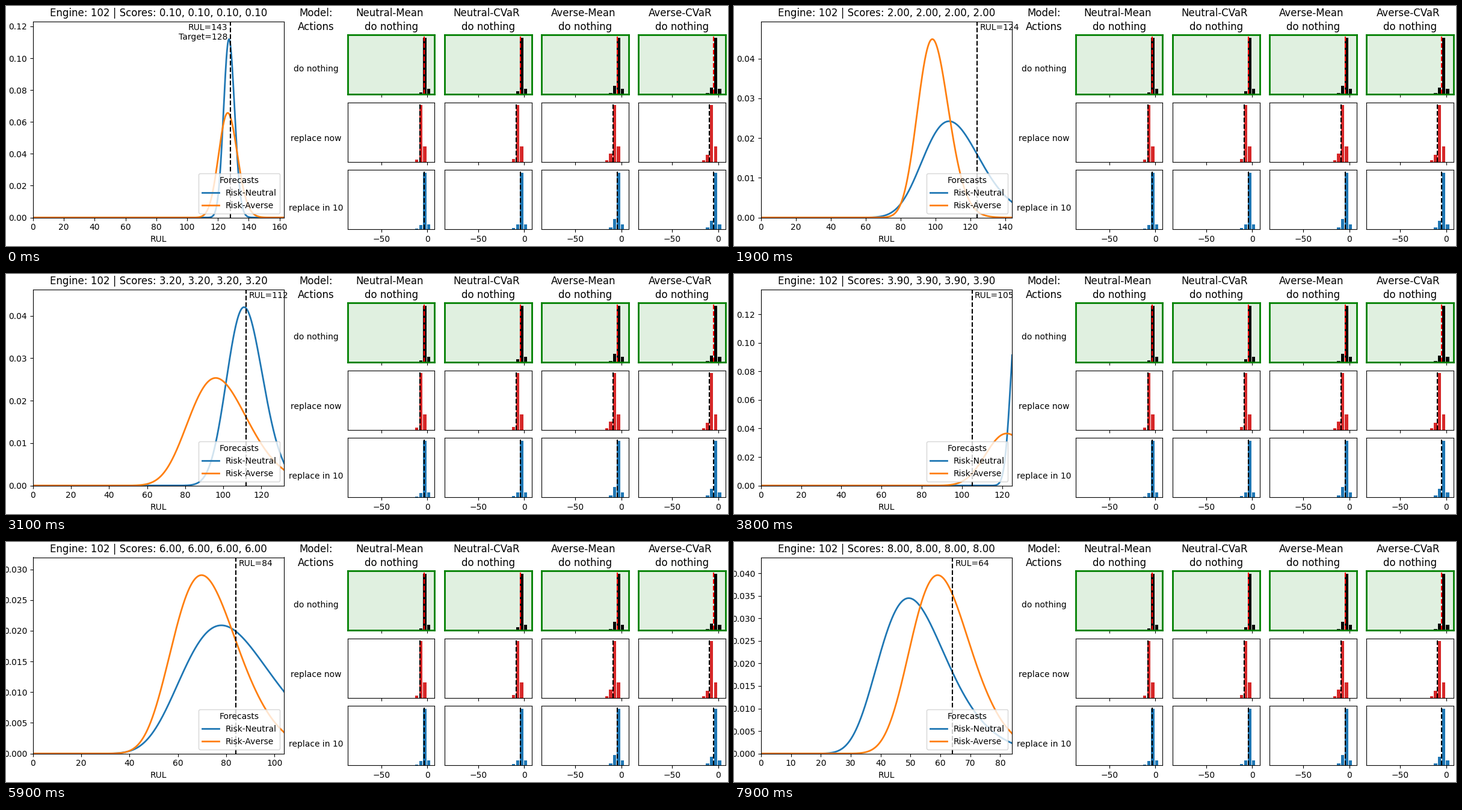
Recreate the animation shown at these times as a matplotlib script. Size 1200 px wide and 400 px high, loop 8000 ms.

```python
import matplotlib.pyplot as plt
import numpy as np
from matplotlib.animation import FuncAnimation
from matplotlib.transforms import Bbox

W, H, DPI = 1200, 400, 100
FRAMES, INTERVAL = 80, 100
START_RUL, TARGET = 143, 128

plt.rcParams.update({"font.family": "DejaVu Sans", "font.size": 10})
fig = plt.figure(figsize=(W / DPI, H / DPI), dpi=DPI, facecolor="white")


def axes_px(x, y, w, h):
    """Axes placed in pixels from the top left corner."""
    return fig.add_axes([x / W, 1 - (y + h) / H, w / W, h / H])


def text_px(x, y, s, **kw):
    return fig.text(x / W, 1 - y / H, s, ha="center", **kw)


# Forecasts: key points (step, mode, log-width) of a log-normal curve
FORECASTS = {
    "Risk-Neutral": [(0, 127.2, .028), (12, 120.9, .086), (25, 96.7, .244),
                     (38, 127.5, .025), (48, 54.7, .31), (59, 78, .238),
                     (79, 49.4, .228)],
    "Risk-Averse": [(0, 126.4, .048), (12, 127.1, .025), (25, 73.5, .27),
                    (38, 122.3, .089), (48, 47.2, .284), (59, 69.8, .193),
                    (79, 59.1, .168)],
}


def lognormal(x, mode, s):
    z = np.log(x / mode) / s - s
    return np.exp(-z * z / 2) / (x * s * np.sqrt(2 * np.pi))


def shape_at(i, keys):
    steps, modes, widths = np.transpose(keys)
    return (np.interp(i, steps, modes),
            np.exp(np.interp(i, steps, np.log(widths))))


main = axes_px(44.9, 25.5, 417.4, 327.05)
main.set_xlabel("RUL")
title = main.set_title("")
curves = {name: main.plot([], [], color=color, lw=2, label=name)[0]
          for name, color in zip(FORECASTS, ("tab:blue", "tab:orange"))}
marker = main.axvline(TARGET, color="black", ls="--", lw=1.5)
note = main.annotate("", (TARGET, 0.99), xycoords=main.get_xaxis_transform(),
                     xytext=(0, 0), textcoords="offset points",
                     va="top", annotation_clip=False)
main.legend(title="Forecasts", loc="lower right")

# Action grid: each histogram has a right bar, a peak and a decaying left tail
BIN, FIRST_BIN = 4.35, 1.45
TAIL_DECAY, SMALLEST = 0.2, 0.012
CELL_W, CELL_H, PITCH_X, PITCH_Y = 144.4, 99.2, 161.14, 112.4
GRID_X, GRID_Y = 568, 48.15
LINE_1, LINE_2 = 17.17, 39.8

# action: bar colour, mean colour, bins shifted left, right bar, extra tail
ACTIONS = {
    "do nothing": ("black", "red", 0, .1, 0),
    "replace now": ("tab:red", "black", 1, .275, 0),
    "replace in 10": ("tab:blue", "black", 0, .085, .035),
}
# model: first tail bar, mean
MODELS = {
    "Neutral-Mean": (.04, -3.6),
    "Neutral-CVaR": (.055, -4.5),
    "Averse-Mean": (.15, -4.5),
    "Averse-CVaR": (.12, -5),
}


def draw_cell(row, col, action, model):
    color, mean_color, shift, right, extra = action
    tail, mean = model
    heights = np.array([right, 1, *(tail + extra) * TAIL_DECAY ** np.arange(3)])
    heights = heights[heights > SMALLEST]
    bins = shift + np.arange(len(heights))

    ax = axes_px(GRID_X + PITCH_X * col, GRID_Y + PITCH_Y * row, CELL_W, CELL_H)
    ax.set(xlim=(-86.5, 7.9), ylim=(0, 1.05), xticks=[-50, 0], yticks=[])
    ax.tick_params(labelbottom=row == 2)
    ax.bar(FIRST_BIN - BIN * bins, heights, width=0.8 * BIN, color=color)
    ax.axvline(mean - BIN * shift, color=mean_color, ls="--", lw=1.5)
    if row == 0:
        ax.set_facecolor("#e0f0e0")
        for spine in ax.spines.values():
            spine.set(color="green", linewidth=2)


text_px(515.2, LINE_1, "Model:", size=12)
text_px(515.2, LINE_2, "Actions", size=12)
for col, name in enumerate(MODELS):
    center = GRID_X + CELL_W / 2 + PITCH_X * col
    text_px(center - 3, LINE_1, name, size=12)
    text_px(center, LINE_2, "do nothing", size=12)
for row, (name, action) in enumerate(ACTIONS.items()):
    label = text_px(515.2, 104.5 + 116 * row, name, va="center")
    label.set_clip_box(Bbox([[0, 0], [559.5, H]]))
    label.set_clip_on(True)
    for col, model in enumerate(MODELS.values()):
        draw_cell(row, col, action, model)


def update(i):
    rul = START_RUL - i
    score = f"{(i + 1) / 10:.2f}"
    title.set_text("Engine: 102 | Scores: " + ", ".join([score] * 4))

    x = np.linspace(0.01, rul + 20, 800)
    peak = 0
    for name, keys in FORECASTS.items():
        mode, s = shape_at(i, keys)
        curves[name].set_data(x, lognormal(x, mode, s))
        peak = max(peak, lognormal(mode, mode, s))
    main.set_xlim(0, rul + 20)
    main.set_ylim(0, 1.1 * peak)

    at = min(rul, TARGET)
    marker.set_xdata([at, at])
    note.xy = (at, 0.99)
    capped = rul > TARGET
    note.set_text(f"RUL={rul}" + (f"\nTarget={TARGET}" if capped else ""))
    note.set_ha("right" if capped else "left")
    note.set_position((-3.2 if capped else 3.2, 0))
    return [title, marker, note, *curves.values()]


anim = FuncAnimation(fig, update, frames=FRAMES, interval=INTERVAL,
                     repeat=True, repeat_delay=0, blit=False)
plt.show()
```
